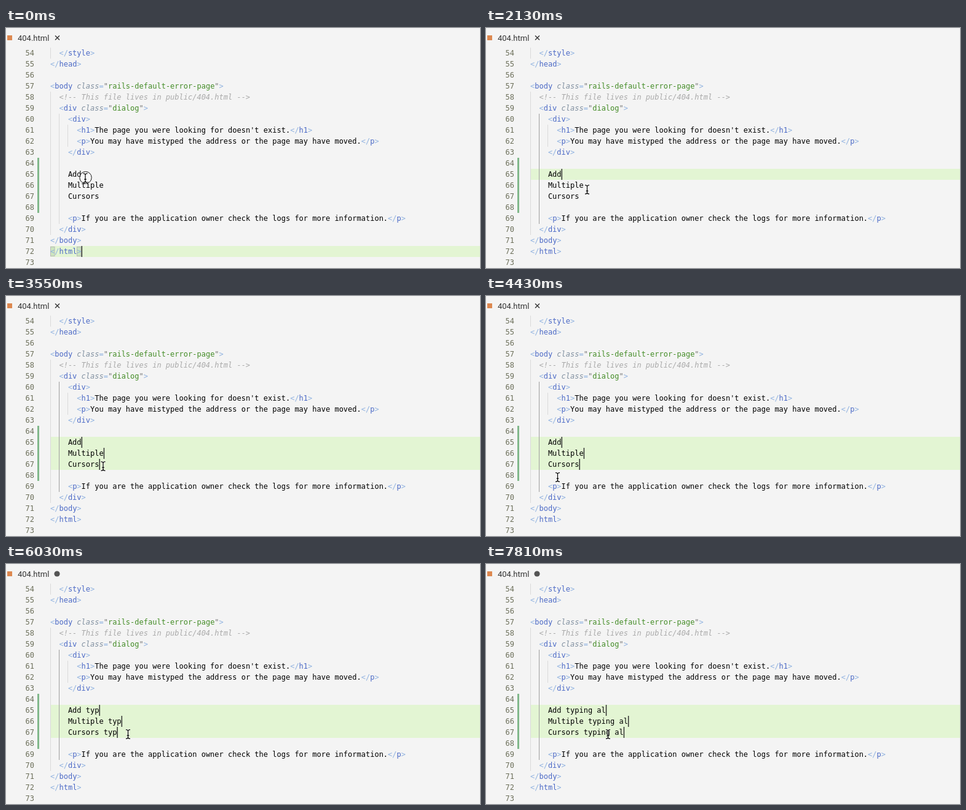
Recreate the animation shown at these times as an HTML page. Size 771 by 392 pixels, loop 7990 ms.

```html
<!DOCTYPE html>
<html lang="en">
<head>
<meta charset="utf-8">
<title>Multiple cursors in an editor</title>
<style>
  html, body { margin: 0; width: 100%; height: 100%; overflow: hidden; background: #f4f4f4; }
  svg { display: block; width: 100vw; height: 100vh; }
  text { white-space: pre; font: 12px "DejaVu Sans Mono", "Liberation Mono", monospace; fill: #000; }
  .tab { font: 13px Roboto, "Liberation Sans", sans-serif; fill: #333; }
  .number { fill: #6d705b; }
  .comment { fill: #aaa; font-style: italic; }
  .punct { fill: #91b3e0; }
  .name { fill: #4b69c6; }
  .attr { fill: #8190a0; font-style: italic; }
  .quote { fill: #777; }
  .string { fill: #448c27; }
</style>
</head>
<body>
<svg id="stage" viewBox="0 0 771 392" xmlns="http://www.w3.org/2000/svg"></svg>
<script>
(() => {
  const LOOP = 7990, TICK = 88.7, BLINK = 485, PRESS = 90;
  const LEFT = 72, CHAR = 7.224, ROW = 18, FIRST = 54, LAST = 72;
  const stage = document.getElementById("stage");

  const code = [
    "  </style>",
    "</head>",
    "",
    "<body class=\"rails-default-error-page\">",
    "  <!-- This file lives in public/404.html -->",
    "  <div class=\"dialog\">",
    "    <div>",
    "      <h1>The page you were looking for doesn't exist.</h1>",
    "      <p>You may have mistyped the address or the page may have moved.</p>",
    "    </div>",
    "",
    "    Add",
    "    Multiple",
    "    Cursors",
    "",
    "    <p>If you are the application owner check the logs for more information.</p>",
    "  </div>",
    "</body>",
    "</html>",
    ""
  ];

  // Each click puts a caret on the next line, from 65 down.
  const clicks = [880, 2480, 3460];

  // Bursts of typing: start, gap between keys, keys ("<" deletes).
  const keys = [
    [5420, 0, " "], [5680, 175, "typ"], [6300, 0, "i"], [6530, 0, "gn"],
    [7110, 80, "<<"], [7370, 90, "ng "], [7720, 90, "al"]
  ].flatMap(([start, gap, word]) => [...word].map((key, i) => ({ key, time: start + i * gap })));

  // The caret starts blinking anew at each of these times.
  const wakes = [-315, ...clicks, ...keys.map(k => k.time)];

  // Pointer moves: start, end, x, y.
  const home = [129, 245];
  const moves = [
    [970, 1500, 150, 258], [1690, 1950, 165, 264], [2045, 2480, 160, 263],
    [2660, 3010, 158, 278], [3640, 4255, 116.5, 296], [4700, 5330, 198.5, 278]
  ];

  const rowTop = line => 32 + (line - FIRST) * ROW;
  const column = n => LEFT + n * CHAR;
  const show = (node, on) => node.setAttribute("visibility", on ? "visible" : "hidden");

  function add(tag, attrs, parent = stage) {
    const node = document.createElementNS("http://www.w3.org/2000/svg", tag);
    for (const key in attrs) node.setAttribute(key, attrs[key]);
    parent.appendChild(node);
    return node;
  }

  function rect(x, y, width, height, fill, more) {
    return add("rect", { x, y, width, height, fill, ...more });
  }

  function label(x, y, content, kind = "plain") {
    const node = add("text", { x, y, class: kind });
    node.textContent = content;
    return node;
  }

  function guide(level, from, to) {
    return rect(Math.floor(column(level * 2)), rowTop(from), 1, (to - from + 1) * ROW, "#d9d9d9");
  }

  function drawCode(source, line) {
    const indent = source.search(/\S|$/);
    const node = label(column(indent), rowTop(line) + 13, "");
    const kinds = ["comment", "punct", "name", "attr", "punct", "quote", "string", "quote", "punct", "plain"];
    const pattern = /(<!--.*-->)|(<\/?)(\w+)|( class)(=)(")([^"]*)(")|(>)|([^<>]+)/g;
    for (const match of source.slice(indent).matchAll(pattern)) {
      match.slice(1).forEach((part, i) => {
        if (part) add("tspan", { class: kinds[i] }, node).textContent = part;
      });
    }
    return node;
  }

  // Backgrounds and gutter
  const bands = {};
  for (const line of [65, 66, 67, LAST]) bands[line] = rect(LEFT, rowTop(line), 699, ROW, "#e3f5d3");
  rect(51, rowTop(64), 3, ROW * 5, "#81b88b");
  guide(0, 54, 54);
  guide(0, 58, 70);
  const block = guide(1, 60, 69);
  guide(2, 61, 62);
  const brackets = [0, 6].map(n => rect(Math.round(column(n)) + 0.5, rowTop(LAST) + 1.5, 6.5, 15,
    "rgba(0,100,0,.1)", { stroke: "#b9b9b9" }));

  // Tab
  rect(2, 12, 8, 8, "#dd8850");
  label(19, 20.5, "404.html", "tab");
  const cross = add("path", { d: "M80 12.5l7 7m0-7l-7 7", stroke: "#333", "stroke-width": 1.4 });
  const dot = add("circle", { cx: 83, cy: 16, r: 4.6, fill: "#555" });

  // Code
  const rows = {};
  code.forEach((source, i) => {
    const line = FIRST + i;
    label(31.5, rowTop(line) + 13, line, "number");
    rows[line] = drawCode(source, line);
  });

  const carets = {};
  for (const line in bands) carets[line] = rect(0, rowTop(line), 1.5, ROW, "#333");

  // Pointer
  const pointer = add("g", {});
  const ring = add("circle", { cx: 0.5, cy: -0.7, r: 9.7, fill: "rgba(255,255,255,.35)", stroke: "#111" }, pointer);
  const beam = "M-3.5-7.3Q-.3-7.3 0-5.3Q.3-7.3 3.5-7.3M0-5.3V5.3M-3.5 7.3Q-.3 7.3 0 5.3Q.3 7.3 3.5 7.3M-1.8 2.2H1.8";
  add("path", { d: beam, fill: "none", stroke: "#fff", "stroke-width": 2.6, opacity: 0.8 }, pointer);
  add("path", { d: beam, fill: "none", stroke: "#000", "stroke-width": 1.2 }, pointer);

  function typedAt(t) {
    return keys.filter(k => k.time <= t)
      .reduce((text, { key }) => key === "<" ? text.slice(0, -1) : text + key, "");
  }

  function pointAt(t) {
    return moves.reduce(([x, y], [start, end, toX, toY]) => {
      const u = Math.min(1, Math.max(0, (t - start) / (end - start)));
      const k = u * u * (3 - 2 * u);
      return [x + (toX - x) * k, y + (toY - y) * k];
    }, home);
  }

  function draw(t) {
    const count = clicks.filter(time => time <= t).length;
    const suffix = typedAt(t);
    const wake = Math.max(...wakes.filter(time => time <= t));
    const lit = Math.floor((t - wake) / BLINK) % 2 === 0;

    for (const line in bands) {
      const last = +line === LAST;
      const on = last ? count === 0 : line - 65 < count;
      const content = code[line - FIRST] + (last ? "" : suffix);
      show(bands[line], on);
      show(carets[line], on && lit);
      carets[line].setAttribute("x", column(content.length));
      if (!last) rows[line].textContent = content.trimStart();
    }

    block.setAttribute("fill", count ? "#9e9e9e" : "#d9d9d9");
    brackets.forEach(node => show(node, t < clicks[0] + PRESS));
    show(cross, !suffix);
    show(dot, suffix);

    const [x, y] = pointAt(Math.floor((t + 10) / TICK) * TICK);
    pointer.setAttribute("transform", `translate(${x} ${y})`);
    show(ring, [-10, ...clicks].some(time => t >= time && t < time + PRESS));
  }

  const begin = performance.now();
  function tick() {
    draw((performance.now() - begin) % LOOP);
    requestAnimationFrame(tick);
  }
  tick();
})();
</script>
</body>
</html>
```
